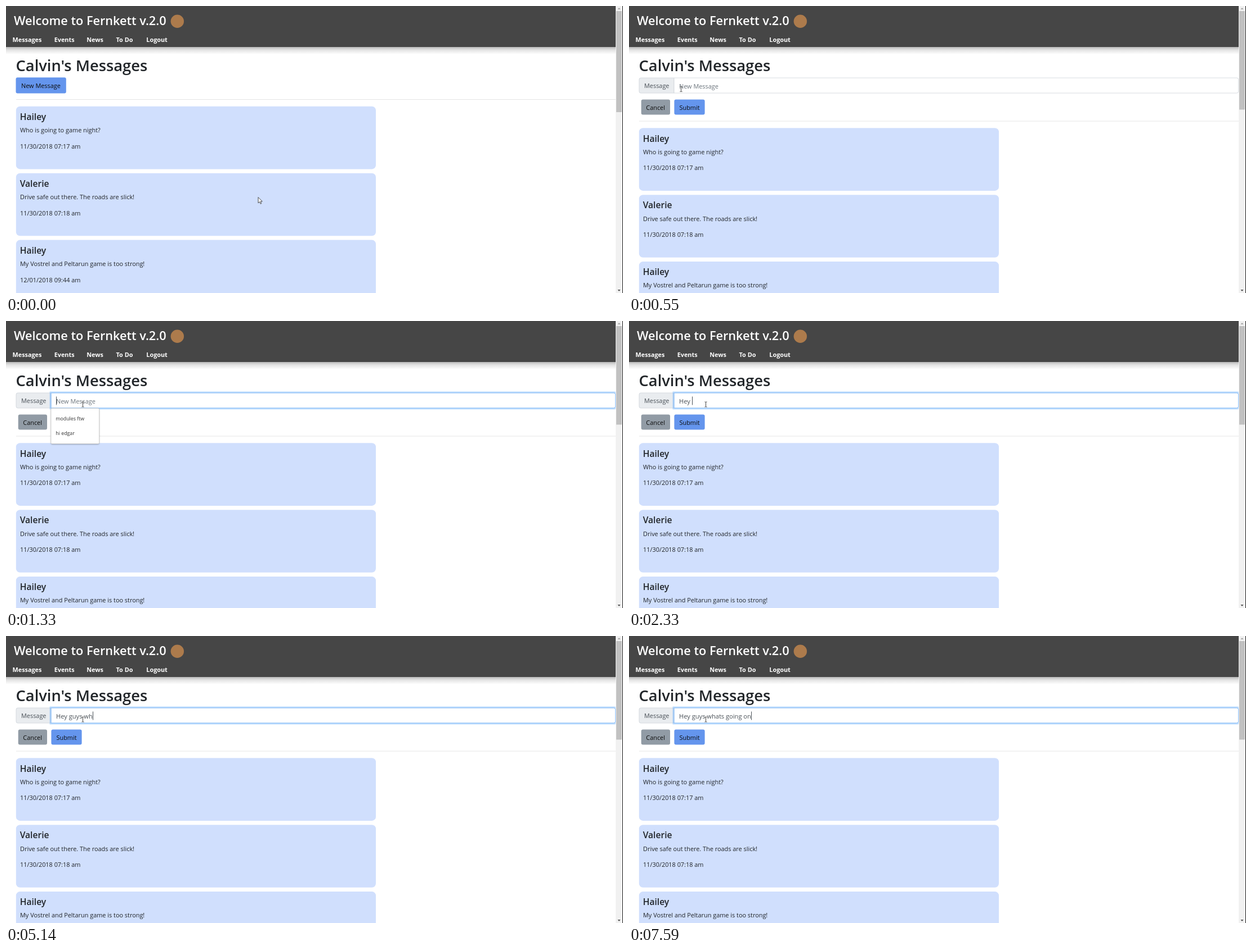
Write an HTML page that moves like this. It is 1096x511 px and loops after 8000 ms.

```html
<!DOCTYPE html>
<html lang="en">
<head>
<meta charset="utf-8">
<title>Messages</title>
<style>
  html, body { margin: 0; width: 100%; height: 100%; overflow: hidden; background: #fff; }
  svg { display: block; }
  text { font: 10.9px "Open Sans", "Noto Sans", sans-serif; fill: #212529; white-space: pre; }
  .title { font-size: 21.7px; font-weight: 600; fill: #fff; }
  .nav text { font-size: 10.85px; font-weight: 700; fill: #fff; }
  .heading { font-size: 27.3px; font-weight: 600; }
  .name { font-size: 15.6px; font-weight: 600; }
  .button { fill: #0c0c0c; }
  .menu text { font-size: 8.8px; fill: #333; }
  .muted { fill: #495057; }
  #hint { fill: #6c757d; }
  #typed { font-size: 11.1px; }
</style>
</head>
<body>
<svg width="1096" height="511" viewBox="0 0 1096 511">
  <defs>
    <linearGradient id="shade" x1="0" y1="0" x2="0" y2="1">
      <stop offset="0" stop-color="#000" stop-opacity=".27"/>
      <stop offset=".4" stop-color="#000" stop-opacity=".11"/>
      <stop offset="1" stop-color="#000" stop-opacity="0"/>
    </linearGradient>
    <filter id="soft" x="-10%" y="-10%" width="120%" height="125%">
      <feDropShadow dx="0" dy="1" stdDeviation="1" flood-opacity=".28"/>
    </filter>
    <clipPath id="page"><rect width="1083" height="511"/></clipPath>
  </defs>
  <rect width="1096" height="511" fill="#fff"/>

  <g clip-path="url(#page)">
    <rect y="73" width="1083" height="13" fill="url(#shade)"/>
    <rect width="1083" height="73" fill="#464646"/>
    <text class="title" x="14" y="34">Welcome to Fernkett v.2.0</text>
    <circle cx="304.3" cy="27.3" r="11.7" fill="#ad7b4c"/>
    <g class="nav" id="nav"></g>
    <text class="heading" x="17.5" y="116">Calvin's Messages</text>

    <g id="opener">
      <rect id="openBtn" x="17.5" y="127.3" width="89.300" height="28.100" rx="3"/>
      <text class="button" x="27" y="146">New Message</text>
    </g>

    <g id="form">
      <path d="M80 128H21a3 3 0 0 0-3 3v21a3 3 0 0 0 3 3h59z" fill="#e9ecef" stroke="#ced4da" stroke-width=".8"/>
      <text class="muted" x="27" y="146">Message</text>
      <path id="field" d="M80 128h999.600a3 3 0 0 1 3 3v21a3 3 0 0 1-3 3H80z" fill="#fff" stroke="#ced4da" stroke-width=".8"/>
      <g id="ring" fill="none">
        <path d="M78.600 126.600h1002a3.500 3.500 0 0 1 3.500 3.500v22.800a3.500 3.500 0 0 1-3.500 3.500h-1002z" stroke="#007bff" stroke-opacity=".25" stroke-width="2.200"/>
        <path d="M80 128h999.600a3 3 0 0 1 3 3v21a3 3 0 0 1-3 3H80z" stroke="#80bdff" stroke-width="1"/>
      </g>
      <text id="hint" x="89" y="146.500">New Message</text>
      <text id="typed" class="muted" x="89" y="146.500"></text>
      <rect id="caret" y="134.500" width="1" height="15" fill="#495057"/>
      <rect x="21.700" y="166.500" width="51.300" height="27" rx="3" fill="#919ba5"/>
      <text class="button" x="30.300" y="185">Cancel</text>
      <rect x="80.400" y="166.500" width="54.200" height="27" rx="3" fill="#6495ed"/>
      <text class="button" x="89.500" y="185">Submit</text>
    </g>

    <g id="feed">
      <rect x="18" y="166" width="1065" height="1" fill="#e5e5e5"/>
    </g>

    <g id="menu" class="menu">
      <rect x="79.900" y="155.500" width="85.600" height="63" rx="2" fill="#fff" stroke="#c8c8c8" stroke-width=".8" filter="url(#soft)"/>
      <text x="88.300" y="177">modules ftw</text>
      <text x="88.300" y="202.500">hi edgar</text>
    </g>
  </g>

  <rect x="1083" width="12" height="511" fill="#f1f1f1"/>
  <rect id="thumb" x="1084" y="9" width="10" fill="#c1c1c1"/>
  <path d="M1086.500 6h5l-2.500-3z" fill="#a3a3a3"/>
  <path d="M1086.500 505h5l-2.500 3z" fill="#505050"/>
  <rect x="1095" width="1" height="511" fill="#1c1c1c"/>

  <g id="arrow">
    <path d="M0 0v10.300l2.400-2.200 1.700 3.700 1.600-.7-1.600-3.600h3.200z" fill="#fff" stroke="#222" stroke-width=".8"/>
  </g>
  <g id="hand">
    <path transform="scale(1.15)" d="M.2 1c0-1.300 1.700-1.300 1.700 0v4l4 .8c.8.2 1.100.7 1 1.500l-.7 4.800H1.600l-3.100-4.300c-.6-1 .5-1.600 1.200-.9l.5.600z" fill="#fff" stroke="#222" stroke-width=".8"/>
  </g>
  <g id="beam">
    <path d="M-2-4.500h1.500l.5.500.5-.5H2M-2 4.500h1.500l.5-.5.5.5H2M0-4v8" fill="none" stroke="#333" stroke-width=".9"/>
  </g>
</svg>
<script>
const LOOP = 8000, OPEN = 550, FOCUS = 1170, BLINK = 540;
const $ = id => document.getElementById(id);
const show = (id, on) => $(id).setAttribute('visibility', on ? 'visible' : 'hidden');

function add(parent, tag, attrs, content) {
  const el = document.createElementNS('http://www.w3.org/2000/svg', tag);
  for (const k in attrs) el.setAttribute(k, attrs[k]);
  if (content) el.textContent = content;
  return parent.appendChild(el);
}

[['Messages', 11.5], ['Events', 85.7], ['News', 143.3], ['To Do', 195.6], ['Logout', 249.3]]
  .forEach(([label, x]) => add($('nav'), 'text', { x, y: 64 }, label));

[
  ['Hailey', 'Who is going to game night?', '11/30/2018 07:17 am'],
  ['Valerie', 'Drive safe out there. The roads are slick!', '11/30/2018 07:18 am'],
  ['Hailey', 'My Vostrel and Peltarun game is too strong!', '12/01/2018 09:44 am']
].forEach(([name, body, date], i) => {
  const y = 178.8 + i * 118.9;
  const card = add($('feed'), 'g');
  add(card, 'rect', { x: 17.8, y, width: 639.2, height: 111.6, rx: 7, fill: '#d0dffd' });
  add(card, 'text', { x: 24.7, y: y + 24.2, class: 'name' }, name);
  add(card, 'text', { x: 25, y: y + 46.3 }, body);
  add(card, 'text', { x: 25, y: y + 75 }, date);
});

// Keystrokes: time and what is typed; '<' deletes one character.
const keys = [
  [1870, 'H'], [2030, 'e'], [2240, 'y'], [2330, ' '], [3660, 'g'], [3960, 'u'],
  [4040, 'y'], [4220, 's'], [4360, ' '], [4900, 'w'], [5140, 'h'], [5220, 'a'],
  [5370, 't'], [5520, 's'], [5690, ' '], [6180, 'g'], [6250, 'oi'], [6480, 'n'],
  [6570, 'g'], [6720, ' '], [6800, 'i'], [7200, '<'], [7350, 'o'], [7590, 'n']
];

function typing(t) {
  let text = '', last = FOCUS;
  for (const [at, key] of keys) {
    if (at > t) break;
    text = key === '<' ? text.slice(0, -1) : text + key;
    last = at;
  }
  return { text, last };
}

// The pointer is redrawn only at these moments.
const ticks = [0, 70, 140, 220, 300, 390, 480, 550, 680, 770, 850, 930, 1010];
const stops = [
  [480, 91, 147.3, 'hand'], [550, 92.5, 148, 'beam'], [680, 106, 151, 'beam'],
  [770, 139, 165, 'arrow'], [850, 153, 172, 'arrow'], [930, 147, 159, 'arrow'],
  [1010, 136.5, 148.5, 'beam']
];

function pointer(t) {
  const now = ticks.filter(k => k <= t).pop();
  if (now >= 480) {
    const [, x, y, kind] = stops.filter(s => s[0] <= now).pop();
    return { x, y, kind };
  }
  const u = now / 480, e = u * u * (3 - 2 * u);
  return { x: 448 - 357 * e, y: 340.5 - 193.5 * e, kind: 'arrow' };
}

function draw(t) {
  const open = t >= OPEN, focused = t >= FOCUS;
  show('opener', !open);
  show('form', open);
  $('openBtn').setAttribute('fill', t >= 480 ? '#12d812' : '#6495ed');
  $('feed').setAttribute('transform', `translate(0 ${open ? 38.5 : 0})`);
  $('thumb').setAttribute('height', open ? 175.5 : 180);

  const { text, last } = typing(t);
  $('typed').textContent = text;
  show('hint', open && !text);
  const width = text ? $('typed').getComputedTextLength() : 0;
  $('caret').setAttribute('x', Math.round(89 + width));
  show('caret', focused && Math.floor((t - last) / BLINK) % 2 === 0);

  show('ring', focused);
  $('ring').setAttribute('opacity', Math.min(1, Math.max(0, (t - FOCUS + 40) / 150)));
  show('menu', t >= 1250 && t < 1950);

  const p = pointer(t);
  for (const kind of ['arrow', 'hand', 'beam']) show(kind, kind === p.kind);
  $(p.kind).setAttribute('transform', `translate(${p.x} ${p.y})`);
}

function frame() {
  draw(performance.now() % LOOP);
  requestAnimationFrame(frame);
}
frame();
</script>
</body>
</html>
```
